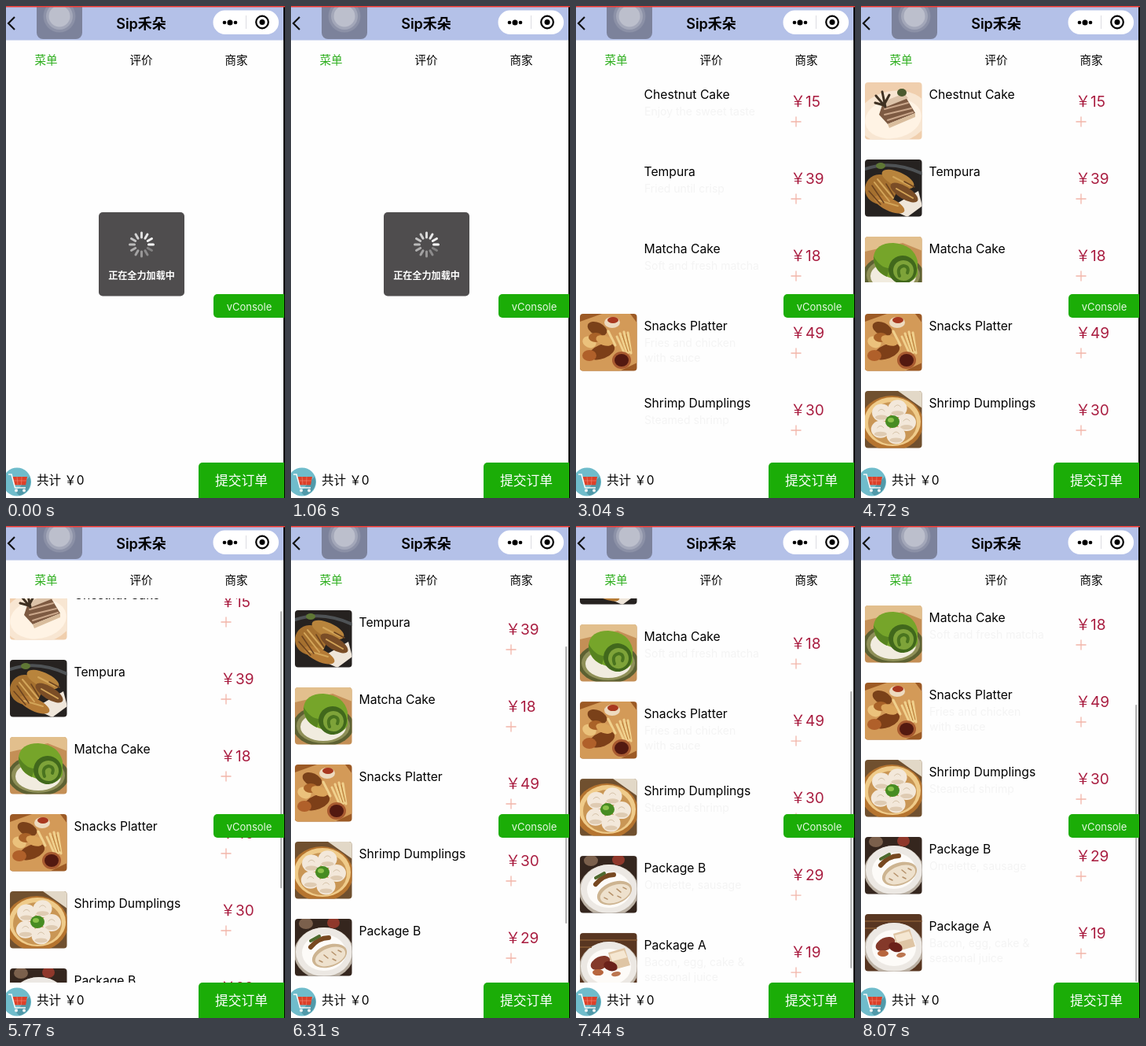
Recreate the animation shown at these times as an HTML page. Size 355x625 px, loop 8.17 s.

```html
<!DOCTYPE html>
<html lang="zh">
<head>
<meta charset="utf-8">
<title>Menu</title>
<style>
  html, body { margin: 0; width: 100%; height: 100%; overflow: hidden; background: #fefefe; }
  svg { display: block; }
  text { font-family: Inter, "Noto Sans CJK SC", "Noto Sans CJK", sans-serif; }
  .mid { text-anchor: middle; }
  .name { font-size: 15.7px; fill: #000; }
  .price { font-size: 19px; fill: #a91d40; }
  .note { font-size: 14px; fill: #f4f4f4; }
  .plus { stroke: #f2b5a9; stroke-width: 1.3; }
</style>
</head>
<body>
<svg id="stage" width="355" height="625" viewBox="0 0 355 625">
  <defs>
    <clipPath id="view"><rect y="92" width="353" height="488"/></clipPath>
    <clipPath id="thumb"><rect width="72.5" height="72.5" rx="4"/></clipPath>
    <clipPath id="half"><rect width="73" height="58"/></clipPath>
  </defs>
  <rect width="355" height="625" fill="#fefefe"/>

  <g clip-path="url(#view)"><g id="list"></g></g>
  <rect id="bar" x="349" width="2.2" height="352" rx="1.1" fill="#b4b4b4"/>

  <!-- header -->
  <rect width="355" height="43.5" fill="#b4c1e8"/>
  <path d="M39 0H97V34a8 8 0 0 1-8 8H47a8 8 0 0 1-8-8z" fill="#7c829b"/>
  <g fill="#fff">
    <circle cx="68" cy="13" r="20.5" fill-opacity=".12"/>
    <circle cx="68" cy="13" r="17" fill-opacity=".2"/>
    <circle cx="68" cy="13" r="13.5" fill-opacity=".28"/>
  </g>
  <path d="M11 14L3 22l8 8" fill="none" stroke="#111" stroke-width="2.2"/>
  <text class="mid" x="172" y="28.5" font-size="18" font-weight="600">Sip禾朵</text>
  <rect x="263.5" y="5.5" width="83.5" height="30.5" rx="15.2" fill="#fff"/>
  <path d="M305.5 12v17" stroke="#dcdce2"/>
  <circle cx="278" cy="21" r="2.3"/><circle cx="285" cy="21" r="3.5"/><circle cx="292" cy="21" r="2.3"/>
  <circle cx="326" cy="20.5" r="7.8" fill="none" stroke="#000" stroke-width="2.2"/>
  <circle cx="326" cy="20.5" r="3.5"/>

  <!-- tabs -->
  <g class="mid" font-size="14.5">
    <text x="51" y="73.5" fill="#2cae1c">菜单</text>
    <text x="172" y="73.5">评价</text>
    <text x="293" y="73.5">商家</text>
  </g>

  <rect x="353" width="2" height="625"/>
  <rect width="355" height="1.5" fill="#ee3b34"/>

  <!-- footer -->
  <circle cx="14" cy="604.5" r="18" fill="#6fbccb"/>
  <path d="M12 617l18-19a18 18 0 0 1-13 24z" fill="#5199a9"/>
  <path d="M8 598H27L25 608.5H11z" fill="#dc4029"/>
  <path d="M14 598l1 10M20 598l-.5 10M9.5 603H26" stroke="#f08a78" stroke-width=".6"/>
  <path d="M3 595h4l4.5 17H25" fill="none" stroke="#f8f8f8" stroke-width="1.6"/>
  <circle cx="13" cy="615.5" r="2" fill="#f4f4f4"/><circle cx="23" cy="615.5" r="2" fill="#f4f4f4"/>
  <text x="39" y="607.5" font-size="15.5">共计 ￥0</text>
  <path d="M245 625V585a5 5 0 0 1 5-5H354V625z" fill="#1bad07"/>
  <text class="mid" x="299.5" y="608.5" font-size="16.8" fill="#fff">提交订单</text>

  <path d="M354 366V396H269a5 5 0 0 1-5-5V371a5 5 0 0 1 5-5z" fill="#1bad07"/>
  <text class="mid" x="309.5" y="386.5" font-size="13" fill="#e6f8e2">vConsole</text>

  <!-- loading toast -->
  <g id="toast">
    <rect x="118" y="262" width="109" height="106.5" rx="5" fill="#4f4d4e"/>
    <g id="spin" stroke="#fff" stroke-width="3" stroke-linecap="round"></g>
    <text class="mid" x="172.5" y="347" font-size="12.1" font-weight="600" fill="#fff">正在全力加载中</text>
  </g>
</svg>

<script>
const LOOP = 8170, ROW = 98, TOP = 92;
const $ = id => document.getElementById(id);

// Drawing helpers for the 72px dish thumbnails
const box = fill => `<rect width="73" height="73" fill="${fill}"/>`;
const oval = (x, y, rx, ry, fill, turn = 0) =>
  `<ellipse cx="${x}" cy="${y}" rx="${rx}" ry="${ry}" fill="${fill}" transform="rotate(${turn} ${x} ${y})"/>`;
const shape = (d, fill) => `<path d="${d}" fill="${fill}"/>`;
const line = (d, color, w) =>
  `<path d="${d}" fill="none" stroke="${color}" stroke-width="${w}" stroke-linecap="round"/>`;
const ring = (n, x, y, r, draw) => Array.from({ length: n }, (_, i) => {
  const a = i * 2 * Math.PI / n - 1.2;
  return draw(x + r * Math.cos(a), y + r * Math.sin(a));
}).join('');

const chestnut = box('#f0cfae') + oval(36, 44, 46, 33, '#f8e6d2', -10) + oval(36, 46, 36, 25, '#fff3e4', -10) +
  shape('M23 26L52 19L64 39L29 53L18 41z', '#7d5a42') +
  shape('M29 53L64 39V44L31 58z', '#d9bd9d') +
  line('M25 34L55 26M25 41L59 33M29 48L61 38', '#c9a68a', 2) +
  shape('M22 25L50 14L55 20L25 32z', '#dcc3a9') +
  line('M14 17l12 14M22 12l4 19M31 16l-7 13M13 26l11 3', '#3f3122', 3) + oval(47, 13, 6, 5, '#4b5a2f');

const tempura = box('#262220') + line('M0 12Q35 0 73 18', '#4e5255', 4) +
  shape('M30 62L68 40L73 59L54 73z', '#efe6da') + oval(20, 8, 6, 4, '#5f7735') +
  oval(20, 38, 20, 19, '#a5702f', 18) + oval(42, 25, 22, 9, '#b8843c', 24) +
  oval(50, 42, 20, 8, '#7a4d26', 32) + oval(31, 57, 21, 8, '#b57b36', 25) +
  line('M12 29L31 53M16 25L36 49M36 22L57 33M40 37L61 49M18 52L42 59', '#d3a559', 2) +
  line('M5 40L20 57M9 33L24 55M27 31L37 47M50 28L63 35', '#6c431f', 1.5);

const matcha = box('#c48f56') + shape('M0 0H73V18L48 8L0 19z', '#e2bf8d') +
  oval(36, 49, 39, 26, '#5d6132') + oval(36, 49, 34, 22, '#8f9058') + oval(36, 50, 29, 18, '#f1ecdf') +
  shape('M11 25Q14 8 36 8Q62 10 67 31V48Q62 58 50 59L26 50Q11 43 11 25z', '#76a52a') +
  shape('M11 25Q20 40 31 40L28 51Q11 43 11 25z', '#578320') +
  oval(48, 42, 18, 18, '#41681c', 14) + oval(49, 43, 13, 13, '#7ea339', 14) +
  line('M44 50Q40 39 49 37Q57 38 54 46', '#4a741f', 4);

const snacks = box('#9c5a25') + shape('M0 10L28 0H64L73 12V62L50 73H0z', '#d39a58') +
  oval(12, 36, 9, 7, '#ebc27c', 25) + oval(22, 19, 13, 8, '#7a4119', 25) + oval(20, 30, 9, 6, '#a96228') +
  oval(41, 11, 10, 7, '#eddabf') + oval(42, 8, 7, 4, '#a8381f') +
  line('M51 25L60 50M56 23L62 49M61 24L65 50M47 29L57 51M36 22L45 40', '#f0d08c', 3) +
  line('M54 27L61 48M59 26L64 47', '#b87a35', 1) +
  oval(28, 48, 17, 9, '#7d3f18', -22) + oval(12, 53, 9, 7, '#b0602a') + oval(31, 34, 11, 6, '#dba45a', 20) +
  oval(53, 59, 12, 11, '#a85a30') + oval(53, 59, 9, 8, '#531910');

const shrimp = box('#70502f') + shape('M42 0H73V22z', '#e2d8c7') + oval(34, 41, 40, 35, '#b5742f') +
  oval(35, 39, 36, 31, '#efcb8a') + oval(35, 41, 31, 27, '#c99655') +
  ring(5, 35, 39, 18, (x, y) => oval(x, y, 12, 11, '#f3e8da') + oval(x, y + 6, 8, 3, '#dfcbb2') +
    line(`M${x - 4} ${y - 2}q4 -5 8 0`, '#d5c2a8', 1)) +
  oval(35, 39, 9, 8, '#478c22') + oval(33, 37, 4, 3, '#8cc24a');

const plate = bg => box(bg) + oval(37, 44, 38, 33, '#bcb2a5') + oval(37, 42, 36, 31, '#ece8e3') +
  oval(37, 43, 28, 23, '#fdfbf8');

const packB = plate('#35261e') + oval(14, 6, 9, 7, '#7b604c') + oval(49, 5, 8, 7, '#8f382b') +
  line('M20 36Q30 24 43 24', '#774820', 6) + line('M20 28L31 22', '#4d6a2e', 4) +
  oval(44, 47, 23, 14, '#cdb491', -20) + oval(45, 48, 20, 11, '#eee1cd', -20) +
  line('M31 53l4 2M37 46l5 4M47 42l5 4M48 51l4 2M55 40l4 2', '#b5916a', 1.5);

const packA = plate('#583621') + line('M0 9H73M0 18H14', '#7b512f', 2) +
  shape('M36 25L57 19L64 41L42 47z', '#dfc5a4') + shape('M38 27L56 22L60 31L41 36z', '#f5e7d2') +
  oval(26, 38, 13, 8, '#84392a', -25) + oval(39, 42, 9, 6, '#6b211a', 18) +
  oval(23, 50, 7, 4, '#b7653d') + oval(46, 52, 6, 3, '#bc7650', -10);

// name, price, picture, time it loads, faint notes
const dishes = [
  ['Chestnut Cake', 15, chestnut, 3460, 'Enjoy the sweet taste'],
  ['Tempura', 39, tempura, 3310, 'Fried until crisp'],
  ['Matcha Cake', 18, matcha, 3610, 'Soft and fresh matcha'],
  ['Snacks Platter', 49, snacks, 3040, 'Fries and chicken', 'with sauce'],
  ['Shrimp Dumplings', 30, shrimp, 3610, 'Steamed shrimp'],
  ['Package B', 29, packB, 3610, 'Omelette, sausage'],
  ['Package A', 19, packA, 3610, 'Bacon, egg, cake &amp;', 'seasonal juice']
];

$('list').innerHTML = dishes.map(([name, price, art, , ...notes], i) => `
  <g transform="translate(0 ${TOP + i * ROW})">
    <g class="photo" transform="translate(5 5)"><g clip-path="url(#thumb)">${art}</g></g>
    <text class="name" x="86.5" y="25.5">${name}</text>
    ${notes.map((n, k) => `<text class="note" x="87" y="${47 + k * 19}">${n}</text>`).join('')}
    <text class="price" x="273" y="36">￥${price}</text>
    <path class="plus" d="M273.5 55h13M280 48.5v13"/>
  </g>`).join('');

$('spin').innerHTML = Array.from({ length: 12 }, (_, i) =>
  `<path d="M172.5 294V288" transform="rotate(${i * 30} 172.5 303)"/>`).join('');

const photos = [...document.querySelectorAll('.photo')];
const notes = [...document.querySelectorAll('.note')];
const spokes = [...$('spin').children];

// The screen refreshes only at these moments
const ticks = [0, 130, 250, 400, 550, 700, 820, 940, 1060, 1210, 1360, 1480, 1600, 1750, 1900, 2020, 2140,
  2260, 2510, 3040, 3310, 3460, 3610, 4110, 4230, 4350, 4720, 5500, 5620, 5770, 5920, 6070, 6190, 6310,
  6430, 6550, 6800, 6920, 7040, 7160, 7320, 7440, 7560, 7710, 7830, 7950, 8070];

// Finger drag: time and scroll offset
const drag = [[5450, 0], [5770, 25], [6310, 88], [6550, 110], [6800, 117], [7160, 149], [7560, 176], [8070, 192]];

function scrollAt(t) {
  if (t <= drag[0][0]) return 0;
  const i = drag.findIndex(([time]) => time >= t);
  const [t0, y0] = drag[i - 1], [t1, y1] = drag[i];
  return y0 + (y1 - y0) * (t - t0) / (t1 - t0);
}

const show = (el, on) => { el.style.display = on ? '' : 'none'; };

function render(time) {
  const t = ticks.findLast(tick => tick <= time);

  const fade = Math.min(1, Math.max(0, (2260 - t) / 400));
  $('toast').setAttribute('opacity', fade);
  const lead = 3 + Math.floor(t * 12 / 1000);
  spokes.forEach((s, i) => {
    const age = ((lead - i) % 12 + 12) % 12;
    s.setAttribute('opacity', 1 - age * 0.065);
  });

  const y = scrollAt(t);
  show($('list'), t >= 2510);
  $('list').setAttribute('transform', `translate(0 ${-y})`);
  show($('bar'), t >= 5500);
  $('bar').setAttribute('y', 90.5 + y * 0.711);

  photos.forEach((p, i) => show(p, t >= dishes[i][3]));
  photos[2].setAttribute('clip-path', t < 5500 ? 'url(#half)' : 'none');
  notes.forEach(n => show(n, t < 4110 || t >= 7320));
}

function loop() {
  render(performance.now() % LOOP);
  requestAnimationFrame(loop);
}
loop();
</script>
</body>
</html>
```
